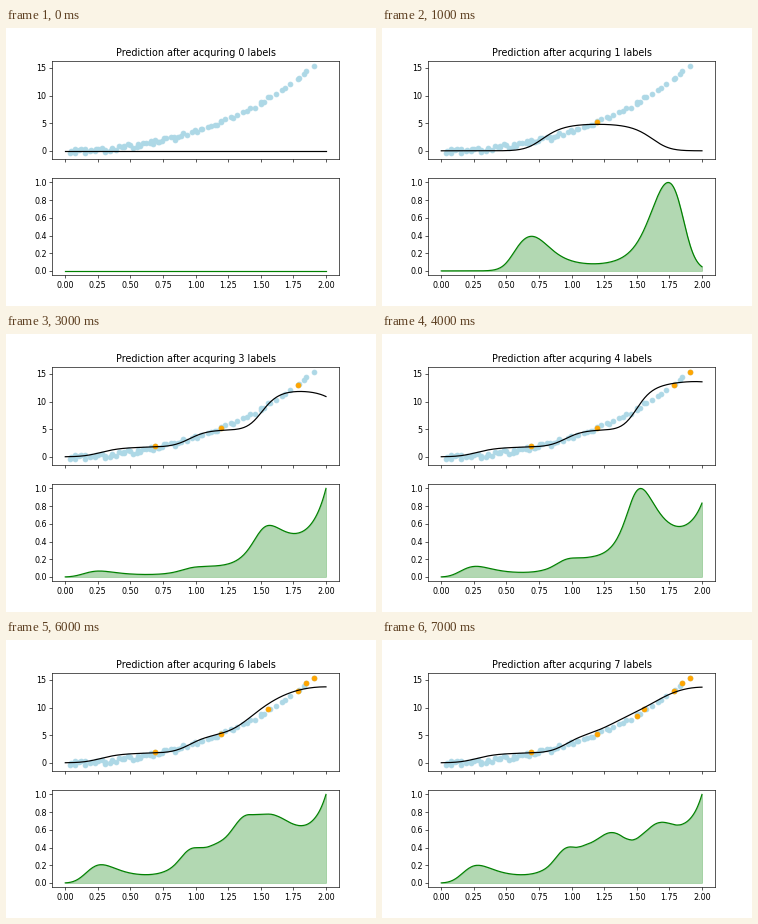
Write a matplotlib script that moves like this. It is 370 px wide and 278 px high and loops after 8000 ms.

```python
import numpy as np
import matplotlib.pyplot as plt
from matplotlib.animation import FuncAnimation

DPI = 57.8125
GAMMA, PRIOR = 15.0, 0.1
DRAWS, DRAW_SIZE = 300, 50

# Labelled samples in the order they are acquired.
LABELS = np.array([(1.198, 5.27), (1.789, 13.03), (.692, 1.9), (1.912, 15.4),
                   (1.559, 9.7), (1.85, 14.4), (1.502, 8.5)])

grid = np.linspace(0, 2, 201)


def make_pool(size=74):
    """Samples that thin out to the right, around a cubic trend."""
    rng = np.random.default_rng(4)
    q = np.linspace(.02, 1, size)
    x = 1.4 * q + .43 * q ** 5 + rng.uniform(-.012, .012, size)
    noise = (.65 - .3 * x) * rng.uniform(-1, 1, size)
    y = x ** 3 + 2 * x ** 2 + x / 2 + noise
    return np.vstack([np.column_stack([x, y]), LABELS])


def predict(counts):
    """Kernel regression on the first labels, shrunk towards zero."""
    x, y = LABELS[:counts.shape[-1]].T
    w = np.exp(-GAMMA * (grid[:, None] - x) ** 2)
    return counts @ (w * y).T / (counts @ w.T + PRIOR)


def utility(n):
    """Expected model change over bootstrap draws, with a peak of one."""
    if n == 0:
        return 0 * grid
    rng = np.random.default_rng(1)
    counts = rng.multinomial(DRAW_SIZE, np.full(n, 1 / n), size=DRAWS)
    change = np.abs(predict(counts) - predict(np.ones(n))).mean(axis=0)
    gain = grid * change
    return gain / gain.max()


fig, (top, low) = plt.subplots(2, 1, sharex=True, dpi=DPI,
                               figsize=(6.4, 4.80865))
fig.subplots_adjust(bottom=.1104, top=.8804)
top.set(xlim=(-.1, 2.1), ylim=(-1.4, 16.2), yticks=[0, 5, 10, 15])
low.set(ylim=(-.05, 1.05), yticks=np.linspace(0, 1, 6))

top.scatter(*make_pool().T, color="lightblue")
chosen = top.scatter([], [], color="orange")
mean_line, = top.plot([], [], color="black")
area = low.fill_between(grid, 0 * grid, color="green", alpha=.3)
gain_line, = low.plot([], [], color="green")
title = top.set_title("")


def draw(n):
    title.set_text(f"Prediction after acquring {n} labels")
    chosen.set_offsets(LABELS[:n])
    mean_line.set_data(grid, predict(np.ones(n)))
    gain = utility(n)
    gain_line.set_data(grid, gain)
    outline = np.column_stack([grid, gain])
    area.set_verts([np.vstack([(0, 0), outline, (2, 0)])])
    return title, chosen, mean_line, gain_line, area


anim = FuncAnimation(fig, draw, frames=8, init_func=lambda: draw(0),
                     interval=1000, repeat=True, repeat_delay=0, blit=False)
plt.show()
```
